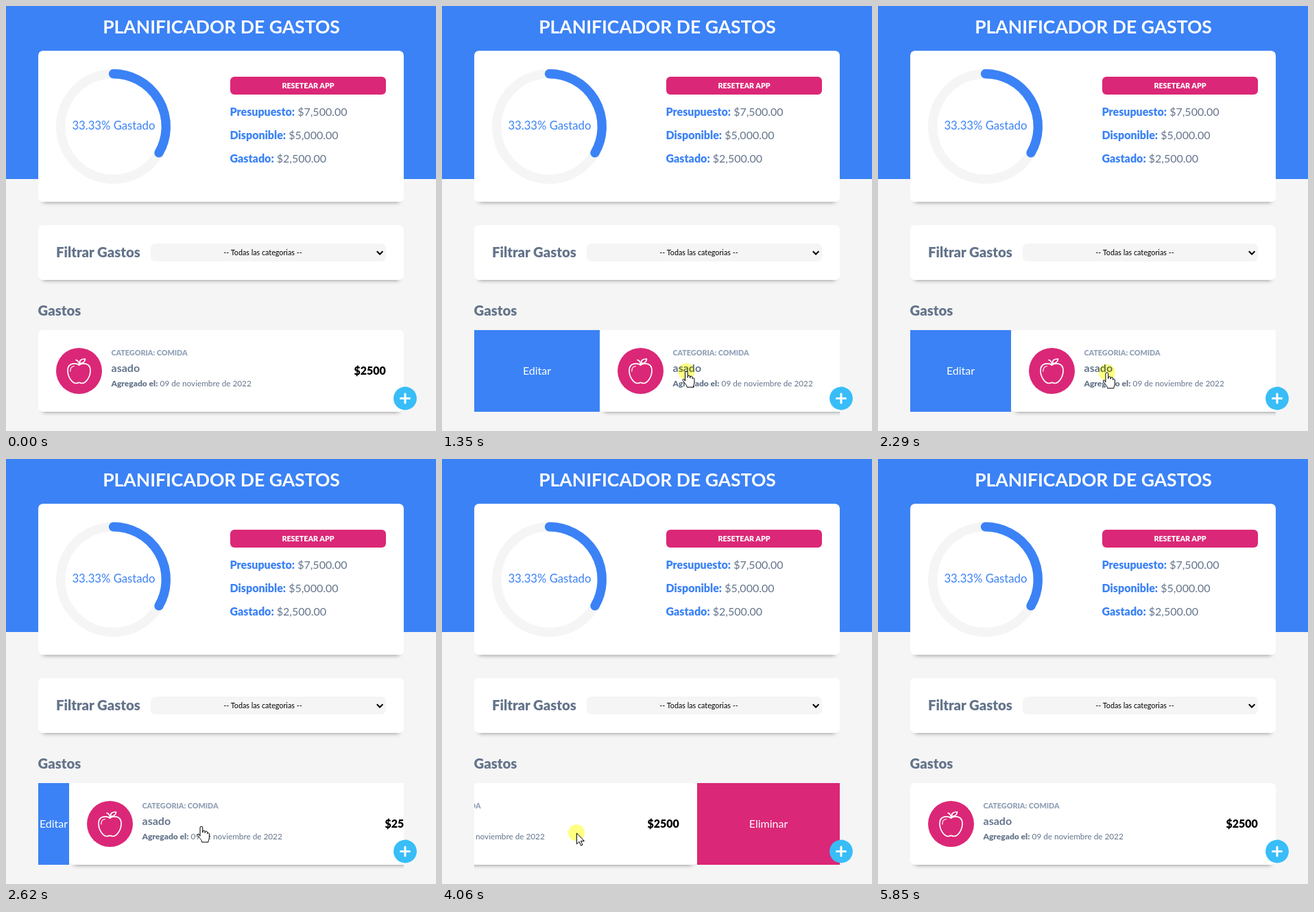
An HTML page for the animation above (6640 ms loop, 627x619 px).

```html
<!DOCTYPE html>
<html lang="es">
<head>
<meta charset="utf-8">
<title>Planificador de gastos</title>
<style>
  html, body { margin: 0; width: 100%; height: 100%; overflow: hidden; background: #f5f5f5; }
  svg { display: block; width: 100%; height: 100%; }
  text { font-family: Lato, sans-serif; font-size: 16px; fill: #64748b; }
  .mid { text-anchor: middle; }
  .end { text-anchor: end; }
  .bold { font-weight: 700; }
  .black { font-weight: 900; }
  .title { font-size: 26.5px; }
  .head { font-size: 20.3px; }
  .ring { font-size: 16.7px; }
  .note { font-size: 12px; }
  .date { font-size: 11.75px; }
  .tiny { font-size: 10.75px; }
  .white { fill: #fff; }
  .blue { fill: #3b82f6; }
  .pink { fill: #db2777; }
  .pale { fill: #94a3b8; }
  .ink { fill: #000; }
  .line { fill: none; stroke-linecap: round; stroke-linejoin: round; }
  #halo { mix-blend-mode: multiply; }
</style>
</head>
<body>
<svg viewBox="0 0 627 619" xmlns="http://www.w3.org/2000/svg">
  <defs>
    <filter id="blur" x="-10%" y="-40%" width="120%" height="180%">
      <feGaussianBlur stdDeviation="3"/>
    </filter>
    <clipPath id="row"><rect x="47" y="472" width="533" height="147"/></clipPath>
    <clipPath id="editClip"><rect id="editBox" x="47" y="472" width="0" height="119"/></clipPath>
    <clipPath id="dropClip"><rect id="dropBox" y="472" width="0" height="119"/></clipPath>
  </defs>

  <rect width="627" height="619" fill="#f5f5f5"/>
  <rect class="blue" width="627" height="252"/>
  <text class="title bold white mid" x="314" y="39.7">PLANIFICADOR DE GASTOS</text>

  <g class="card" data-y="65.3" data-h="220"></g>
  <g class="line" stroke-width="13.4">
    <circle cx="156.5" cy="175.5" r="76.8" stroke="#f5f5f5"/>
    <path d="M156.5 98.7A76.8 76.8 0 0 1 223 213.9" stroke="#3b82f6"/>
  </g>
  <text class="ring blue mid" x="156.9" y="179.8">33.33% Gastado</text>
  <rect class="pink" x="327" y="103" width="227" height="26" rx="6"/>
  <text class="tiny black white mid" x="440.5" y="119.8">RESETEAR APP</text>
  <g id="sums"></g>

  <g class="card" data-y="319" data-h="80"></g>
  <text class="head black" x="73" y="365.5">Filtrar Gastos</text>
  <rect x="211" y="346" width="343" height="26" rx="6.7" fill="#f5f5f5"/>
  <text class="tiny ink mid" x="374.5" y="362.8">-- Todas las categorias --</text>
  <path d="M540.8 357.2l4.3 4.3 4.3-4.3" fill="none" stroke="#000" stroke-width="2"/>

  <text class="head black" x="46.6" y="450.5">Gastos</text>
  <g clip-path="url(#row)">
    <g clip-path="url(#editClip)">
      <rect class="blue" x="47" y="472" width="533" height="119"/>
      <text id="edit" class="white mid" y="537">Editar</text>
    </g>
    <g id="item">
      <g class="card" data-y="472" data-h="119"></g>
      <circle class="pink" cx="106.5" cy="531.5" r="33.5"/>
      <g class="line" stroke="#fff" stroke-width="1.7">
        <path d="M106.5 523C110 520 123 518.5 123 531C123 541 116 549.5 111 549.5C108.5 549.5 108.2 548.4 106.5 548.4C104.8 548.4 104.5 549.5 102 549.5C97 549.5 90 541 90 531C90 518.5 103 520 106.5 523Z"/>
        <path d="M106.5 522.5C106.5 519 105 516.5 102 515.5"/>
        <path d="M107.5 520.3C107 516 110 514 115.5 514C115.5 518 112 520.8 107.5 520.3Z"/>
        <path d="M93.8 532C93.6 527.5 96 525 99.5 524.5" stroke-width="1.2"/>
      </g>
      <text class="tiny black pale" x="153.4" y="508.8">CATEGORIA: COMIDA</text>
      <text class="bold" x="153.6" y="532.6">asado</text>
      <text class="note black" x="153.4" y="554">Agregado el:</text>
      <text class="date" x="224.6" y="554">09 de noviembre de 2022</text>
      <text class="black ink end" x="553.8" y="536.8">$2500</text>
    </g>
    <g clip-path="url(#dropClip)">
      <rect class="pink" x="47" y="472" width="533" height="119"/>
      <text id="drop" class="white mid" y="537">Eliminar</text>
    </g>
  </g>

  <circle cx="582" cy="571.5" r="16.9" fill="#38bdf8"/>
  <path class="line" d="M575.5 571.5h13M582 565v13" stroke="#fff" stroke-width="3"/>

  <circle id="halo" r="12" fill="#ffff80"/>
  <g id="pointer" fill="#fff" stroke="#000" stroke-linejoin="round">
    <path id="arrow" d="M.5 .5V16.5L4.2 13L6.7 18.7L9 17.7L6.6 12.1H11.5Z"/>
    <path id="hand" d="M-1.9 14V2a1.9 1.9 0 0 1 3.8 0V9V7.8a1.7 1.7 0 0 1 3.4 0V9.6V8.6a1.6 1.6 0 0 1 3.3 0V10.6a1.5 1.5 0 0 1 2.9 0V16C11.5 19 10 20 10 23H.8C.8 20 -2.5 17.5 -5.2 13.2C-6 11.2 -4.2 10.4 -3.2 11.8Z"/>
  </g>
</svg>
<script>
const LOOP = 6640, STEP = 67.5, LEFT = 47, RIGHT = 580;
const $ = id => document.getElementById(id);

// Row offset: drag right, let go, drag left, let go
const SWIPE = [
  [775, 0], [1810, 241], [2070, 241], [2550, 98], [2760, 0],
  [3230, 0], [4340, -228], [4870, -228], [5300, -90], [5500, 0]
];

// Pointer: enter, follow both drags, leave at the bottom
const PATH = [
  [330, 240, 591], [715, 172, 533], [1810, 407, 532], [2070, 407, 532],
  [2620, 282, 535], [3050, 404, 537], [3180, 404, 537], [4340, 178, 545],
  [4870, 178, 545], [5500, 321, 539], [5850, 565, 640]
];

// The screen refreshes at a steady rate
const snap = t => Math.floor(t / STEP + 0.4) * STEP - 6;
const easeOut = p => Math.sin(p * Math.PI / 2);

function sample(keys, t, col = 1) {
  const i = keys.findIndex(k => k[0] > t);
  if (i === 0) return keys[0][col];
  if (i < 0) return keys[keys.length - 1][col];
  const a = keys[i - 1], b = keys[i];
  return a[col] + (b[col] - a[col]) * easeOut((t - a[0]) / (b[0] - a[0]));
}

const within = (t, a, b) => t >= a && t < b;
const show = (el, on) => el.setAttribute('visibility', on ? 'visible' : 'hidden');
const move = (el, x, y) => el.setAttribute('transform', `translate(${x} ${y})`);

function buildCards() {
  for (const card of document.querySelectorAll('.card')) {
    const y = +card.dataset.y, h = +card.dataset.h;
    card.innerHTML =
      `<rect x="54" y="${y + 20}" width="519" height="${h - 20}" opacity=".5" filter="url(#blur)"/>` +
      `<rect x="47" y="${y}" width="533" height="${h}" rx="6.7" fill="#fff"/>`;
  }
}

function buildSums() {
  const sums = { Presupuesto: '$7,500.00', Disponible: '$5,000.00', Gastado: '$2,500.00' };
  $('sums').innerHTML = Object.entries(sums).map(([name, sum], i) =>
    `<text x="326.5" y="${159.8 + 34 * i}"><tspan class="black blue">${name}:</tspan> ${sum}</text>`
  ).join('');
}

function draw(time) {
  const t = snap(time);
  const dx = Math.round(sample(SWIPE, t));
  const x = sample(PATH, t, 1), y = sample(PATH, t, 2);

  move($('item'), dx, 0);
  $('editBox').setAttribute('width', Math.max(0, dx));
  $('edit').setAttribute('x', LEFT + dx / 2);
  $('dropBox').setAttribute('x', RIGHT + Math.min(0, dx));
  $('dropBox').setAttribute('width', Math.max(0, -dx));
  $('drop').setAttribute('x', RIGHT + dx / 2);

  const visible = within(t, 330, 5850);
  const hand = within(t, 740, 2720);
  move($('pointer'), x, y);
  move($('halo'), x, y);
  show($('halo'), within(t, 715, 2550) || within(t, 3100, 5300));
  show($('hand'), visible && hand);
  show($('arrow'), visible && !hand);
}

buildCards();
buildSums();
draw(0);
const start = performance.now();
function tick() {
  draw((performance.now() - start) % LOOP);
  requestAnimationFrame(tick);
}
requestAnimationFrame(tick);
</script>
</body>
</html>
```
